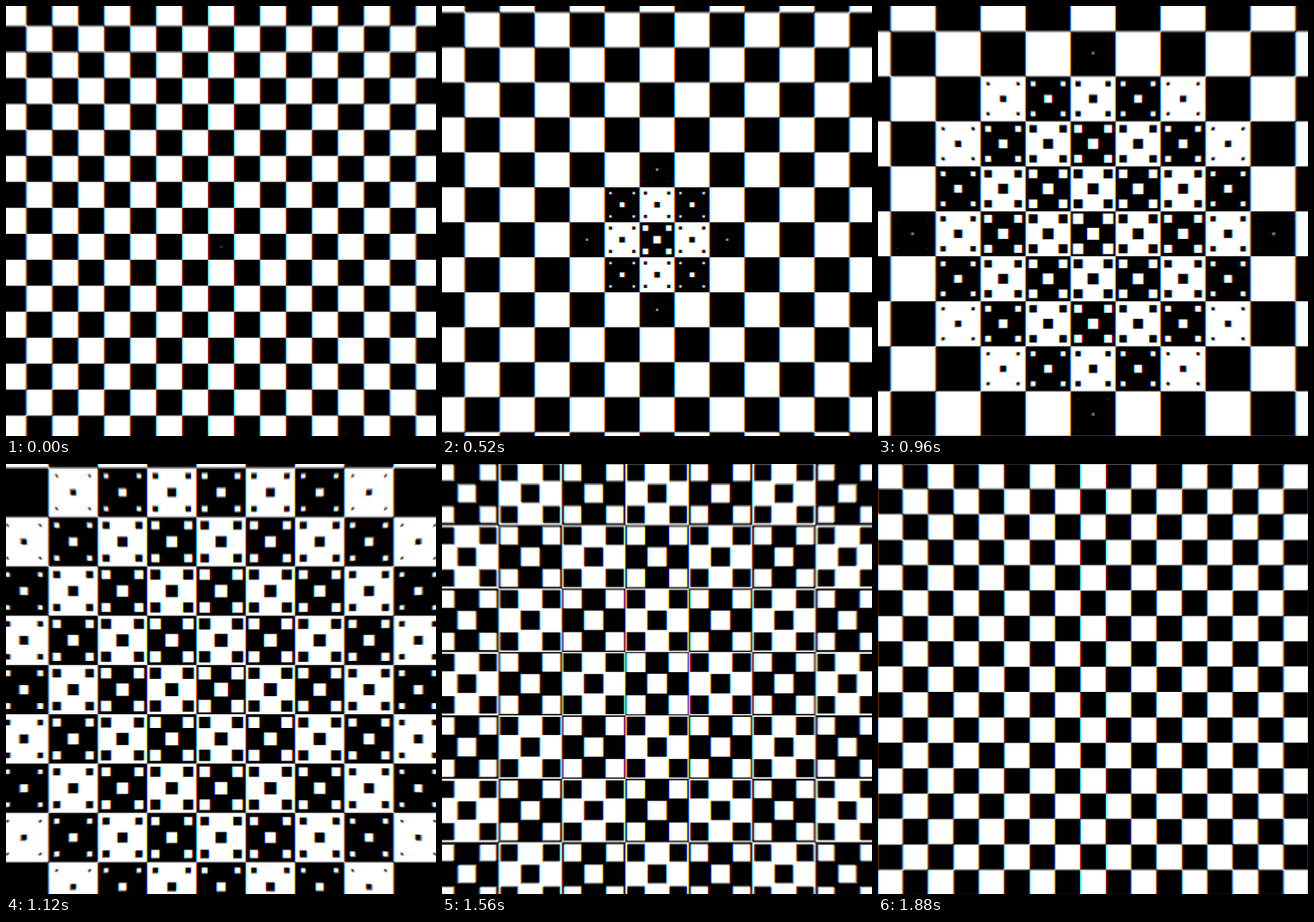
Animation of 500x500 px, one loop 1920 ms. Source, as an HTML page with a canvas:

```html
<!DOCTYPE html>
<html>
<head>
<meta charset="utf-8">
<style>
  html, body { margin: 0; width: 100%; height: 100%; overflow: hidden; background: #000; }
  canvas { display: block; }
</style>
</head>
<body>
<canvas id="stage" width="500" height="500"></canvas>
<script>
const ctx = document.getElementById('stage').getContext('2d');
const LOOP = 1920, STEP = 40, CELL = 30.2;
const SAMPLES = 5, SHUTTER = 0.6;
// Start of growth, as a share of the loop, by whole-cell distance from the middle
const DELAYS = [0, 0.18, 0.268, 0.4, 0.5, 0.565, 0.62];
// Channels sit a fraction of a pixel apart, which tints the upright edges
const LEVEL = 255 / SAMPLES;
const CHANNELS = [
  [`rgb(${LEVEL},0,0)`, 0.8],
  [`rgb(0,${LEVEL},0)`, 0],
  [`rgb(0,0,${LEVEL})`, -0.8]
];

function delayAt(distance) {
  const i = Math.min(Math.floor(distance), DELAYS.length - 2);
  return Math.min(0.9, DELAYS[i] + (DELAYS[i + 1] - DELAYS[i]) * (distance - i));
}

function growth(p, distance) {
  const delay = delayAt(distance);
  return Math.cbrt(Math.max(0, (p - delay) / (1 - delay) + 0.0006));
}

// Corner squares trail the middle one and catch up at the end
const cornerGrowth = k => k * k * (1.2 - 0.2 * k ** 3);

function addSquare(path, x, y, size) {
  if (size > 0) path.rect(x - size / 2, y - size / 2, size, size);
}

function boardPath(p) {
  const path = new Path2D();
  const cell = CELL * 3 ** p, sub = cell / 3;
  const cx = 250, cy = 280 - CELL * p;
  const reach = Math.ceil(290 / cell) + 1;
  for (let row = -reach; row <= reach; row++) {
    for (let col = -reach; col <= reach; col++) {
      const x = cx + col * cell, y = cy + row * cell;
      if ((row + col) % 2) addSquare(path, x, y, cell);
      // Even-odd filling inverts these inside their cell
      const k = growth(p, Math.hypot(row, col));
      addSquare(path, x, y, sub * k);
      for (const dx of [-sub, sub])
        for (const dy of [-sub, sub])
          addSquare(path, x + dx, y + dy, sub * cornerGrowth(k));
    }
  }
  return path;
}

function draw(step) {
  ctx.setTransform(1, 0, 0, 1, 0, 0);
  ctx.globalCompositeOperation = 'source-over';
  ctx.fillStyle = '#000';
  ctx.fillRect(0, 0, 500, 500);
  ctx.globalCompositeOperation = 'lighter';
  // Motion blur: add up moments spread around the step
  for (let i = 0; i < SAMPLES; i++) {
    const offset = ((i + 0.5) / SAMPLES - 0.5) * SHUTTER;
    const path = boardPath((step + offset) * STEP / LOOP);
    for (const [color, shift] of CHANNELS) {
      ctx.setTransform(1, 0, 0, 1, shift, 0);
      ctx.fillStyle = color;
      ctx.fill(path, 'evenodd');
    }
  }
}

let start, shown;
function tick(now) {
  start ??= now;
  const step = Math.floor(((now - start) % LOOP) / STEP);
  if (step !== shown) draw(shown = step);
  requestAnimationFrame(tick);
}
draw(0);
requestAnimationFrame(tick);
</script>
</body>
</html>
```
